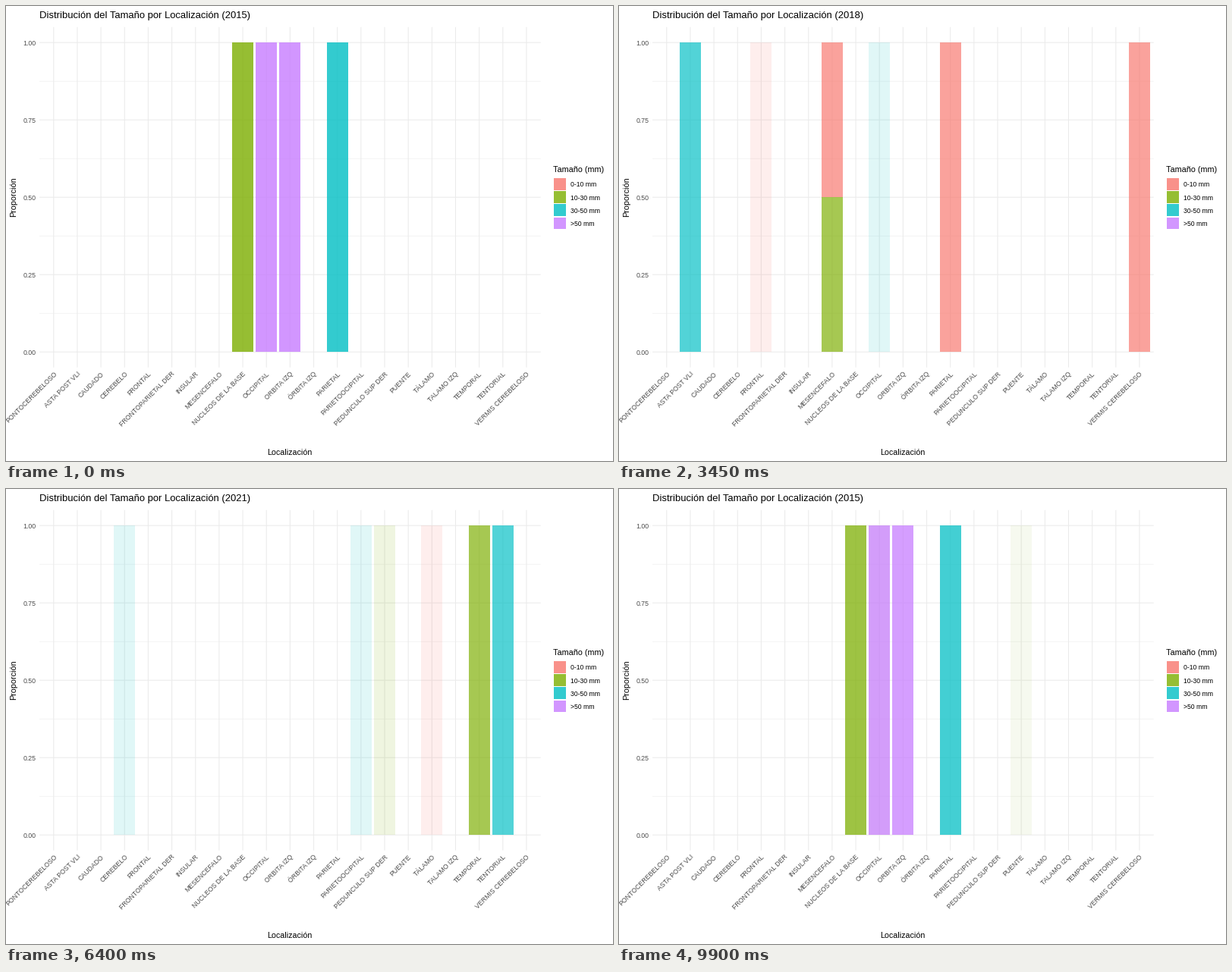
Recreate the animation shown at these times as a matplotlib script. Size 800 by 600 pixels, loop 10000 ms.

```python
import matplotlib.pyplot as plt
from matplotlib.animation import FuncAnimation
from matplotlib.collections import LineCollection
from matplotlib.patches import Rectangle

plt.rcParams["font.family"] = "Liberation Sans"

DPI = 100
FRAMES, INTERVAL = 200, 50
ALPHA = 0.8

LEFT, TOP, BOTTOM = 44.08, 27.8, 476.6
STEP = 31.16
RIGHT = LEFT + 21.2 * STEP
BAR_WIDTH = 28
Y0, Y1 = 456.2, 48.2

COLORS = {"R": "#F8766D", "G": "#7CAE00", "T": "#00BFC4", "P": "#C77CFF"}
SIZES = ["0-10 mm", "10-30 mm", "30-50 mm", ">50 mm"]
PLACES = [
    "PONTOCEREBELOSO", "ASTA POST VLI", "CAUDADO", "CEREBELO", "FRONTAL",
    "FRONTOPARIETAL DER", "INSULAR", "MESENCEFALO", "NUCLEOS DE LA BASE",
    "OCCIPITAL", "ORBITA IZQ", "ÓRBITA IZQ", "PARIETAL", "PARIETOOCIPITAL",
    "PEDUNCULO SUP DER", "PUENTE", "TÁLAMO", "TALAMO IZQ", "TEMPORAL",
    "TENTORIAL", "VERMIS CEREBELOSO",
]

# Per year: (place index, size keys from the bottom up, share of the lowest part)
FIRST_YEAR = 2015
YEARS = [
    [(8, "G", 1), (9, "P", 1), (10, "P", 1), (12, "T", 1)],
    [(2, "R", 1), (3, "R", 1), (11, "R", 1), (12, "G", 1), (13, "G", 1), (17, "R", 1)],
    [(0, "T", 1), (3, "P", 1)],
    [(1, "T", 1), (7, "GR", 0.5), (12, "R", 1), (20, "R", 1)],
    [(4, "R", 1), (9, "T", 1)],
    [(4, "T", 1), (5, "T", 1), (9, "R", 1), (12, "P", 1), (15, "R", 1), (18, "R", 1)],
    [(18, "G", 1), (19, "T", 1)],
    [(3, "T", 1), (13, "T", 1), (14, "G", 1), (16, "R", 1)],
    [(3, "G", 1), (4, "PG", 0.047), (6, "GR", 0.5), (8, "R", 1), (18, "T", 1)],
    [(9, "G", 1), (15, "G", 1)],
]

# Last still frame before each cross-fade, and the fade lengths in frames
STARTS = [6, 27, 47, 67, 87, 106, 126, 146, 166, 186]
LENGTHS = [14] + [13] * 9

fig = plt.figure(figsize=(8, 6), dpi=DPI, facecolor="white")
ax = fig.add_axes([0, 0, 1, 1])
ax.set_xlim(0, 800)
ax.set_ylim(600, 0)
ax.axis("off")


def px(size):
    return size * 72 / DPI


def label(x, y, text, size, color="black", **kw):
    return ax.text(x, y, text, fontsize=px(size), color=color, va="baseline",
                   rotation_mode="anchor", **kw)


def place_x(i):
    return LEFT + (0.6 + i) * STEP


def share_y(v):
    return Y0 + v * (Y1 - Y0)


def grid(segments, width):
    lines = LineCollection(segments, colors="#EBEBEB", linewidths=px(width),
                           capstyle="butt", snap=False, zorder=1)
    ax.add_collection(lines, autolim=False)


def block(x, top, width, bottom, key):
    """Filled box whose edges sit on whole pixels."""
    x, top, bottom = round(x), round(top), round(bottom)
    rect = Rectangle((x, top), width, bottom - top, facecolor=COLORS[key],
                     linewidth=0, alpha=ALPHA, zorder=2)
    return ax.add_patch(rect)


def year_bars(rows):
    bars = []
    for i, keys, cut in rows:
        edges = [0, cut, 1]
        for key, lo, hi in zip(keys, edges, edges[1:]):
            bars.append(block(place_x(i) - 0.45 * STEP, share_y(hi),
                              BAR_WIDTH, share_y(lo), key))
    return bars


def draw_static():
    grid([[(LEFT, share_y(v)), (RIGHT, share_y(v))]
          for v in (0.125, 0.375, 0.625, 0.875)], 0.53)
    grid([[(LEFT, share_y(v / 4)), (RIGHT, share_y(v / 4))] for v in range(5)]
         + [[(place_x(i), TOP), (place_x(i), BOTTOM)] for i in range(21)], 1.07)

    for v in range(5):
        label(39.3, share_y(v / 4) + 3.3, f"{v / 4:.2f}", 8.8, "#4D4D4D", ha="right")
    for i, name in enumerate(PLACES):
        label(place_x(i) + 4.6, 485.6, name, 8.8, "#4D4D4D", ha="right", rotation=45)
    label(374, 592, "Localización", 10.6, ha="center")
    label(13, 252, "Proporción", 10.8, ha="center", rotation=90)

    label(721, 219, "Tamaño (mm)", 10.9)
    for i, (key, text) in enumerate(zip(COLORS, SIZES)):
        y = 226.8 + 17.28 * i
        block(722, y, 16, y + 15.8, key)
        label(743.6, y + 11.5, text, 8.7)


draw_static()
title = label(44, 16, "", 13)
bars = [year_bars(rows) for rows in YEARS]


def fade(year, amount, layer):
    for bar in bars[year]:
        bar.set_visible(amount > 0)
        bar.set_alpha(ALPHA * amount)
        bar.set_zorder(layer)


def update(n):
    old = max(sum(s <= n for s in STARTS) - 1, 0)
    new = (old + 1) % len(YEARS)
    p = min(max((n - STARTS[old]) / LENGTHS[old], 0), 1)
    for year in range(len(YEARS)):
        fade(year, 0, 2)
    fade(old, 1 - p, 2)
    fade(new, p, 3)
    shown = FIRST_YEAR + (new if p >= 0.5 else old)
    title.set_text(f"Distribución del Tamaño por Localización ({shown})")
    return []


anim = FuncAnimation(fig, update, frames=FRAMES, interval=INTERVAL,
                     init_func=lambda: update(0), repeat=True, repeat_delay=0)
plt.show()
```
